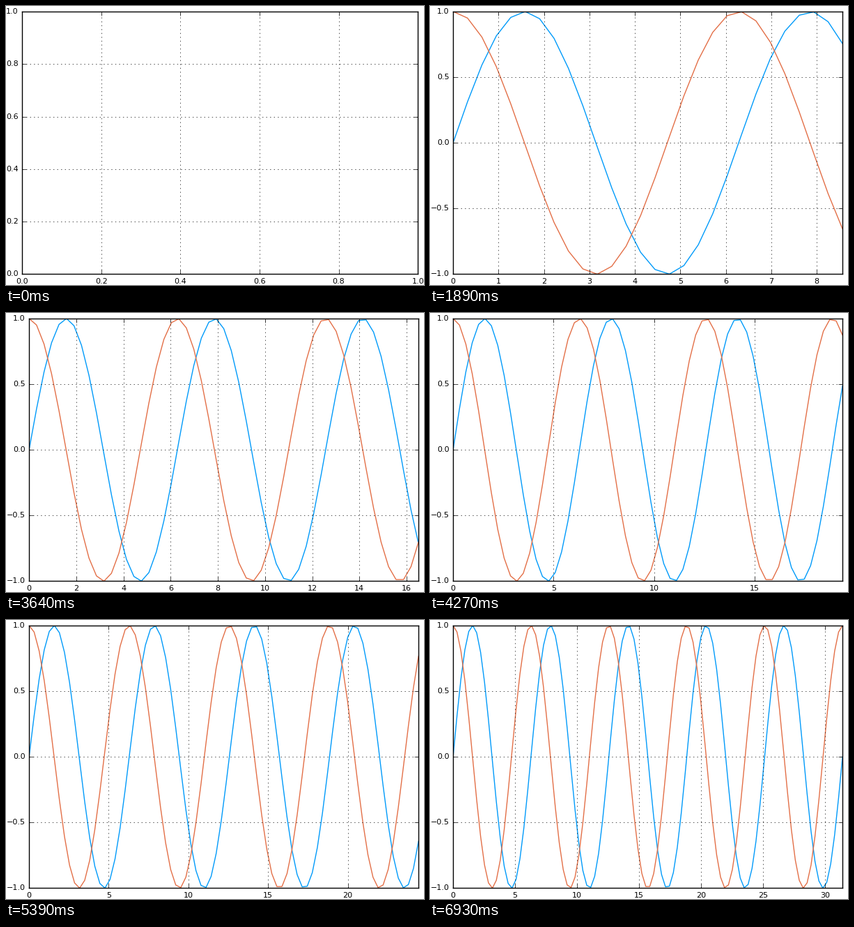
A matplotlib script for the animation above (7000 ms loop, 600x400 px).

```python
import math

import numpy as np
import matplotlib.pyplot as plt
from matplotlib.animation import FuncAnimation

WIDTH, HEIGHT, DPI = 600, 400, 100
COUNT, INTERVAL = 100, 70
MIN_PAD = 2 / 25.4 * DPI      # two millimetres
BOTTOM_PAD = 15.54
MAX_BINS = 9

plt.style.use("classic")
plt.rcParams.update({
    "font.family": "DejaVu Sans",
    "font.size": 8,
    "xtick.labelsize": 8,
    "ytick.labelsize": 8,
    "figure.facecolor": "white",
    "savefig.facecolor": "white",
    "axes.grid": True,
})

x = np.linspace(0, 10 * math.pi, COUNT)
waves = np.array([np.sin(x), np.cos(x)])

fig = plt.figure(figsize=(WIDTH / DPI, HEIGHT / DPI), dpi=DPI)
ax = fig.add_axes([0, 0, 1, 1])
lines = [ax.plot([], [], color=c, lw=1)[0] for c in ("#009AFA", "#E36F47")]


def tick_step(lo, hi):
    raw = (hi - lo) / MAX_BINS
    scale = 10.0 ** math.floor(math.log10(raw))
    return next(m * scale for m in (1, 2, 5, 10) if m * scale >= raw)


def ticks(lo, hi, pixels):
    """Tick places and labels; a tick within half a pixel of the edge counts."""
    step = tick_step(lo, hi)
    slack = 0.5 * (hi - lo) / pixels
    first = math.ceil((lo - slack) / step)
    last = math.floor((hi + slack) / step)
    values = [k * step for k in range(first, last + 1)]
    digits = max(0, -math.floor(math.log10(step)))
    labels = [f"{v:.{digits}f}".replace("-", "\u2212") for v in values]
    return np.clip(values, lo, hi), labels


def update(i):
    seen = waves[:, :i + 1]
    for line, y in zip(lines, seen):
        line.set_data(x[:i + 1], y)

    x_max = x[i] if i else 1.0
    y_min = seen.min()
    y_ticks, y_labels = ticks(y_min, 1.0, HEIGHT - MIN_PAD - BOTTOM_PAD)

    # The margins follow the labels that stick out of the plot area.
    left = 33.1 if y_labels[0].startswith("\u2212") else 23.2
    right = MIN_PAD if i else 8.85
    width = WIDTH - left - right
    height = HEIGHT - MIN_PAD - BOTTOM_PAD
    ax.set_position([left / WIDTH, BOTTOM_PAD / HEIGHT,
                     width / WIDTH, height / HEIGHT])

    x_ticks, x_labels = ticks(0.0, x_max, width)
    ax.set_xticks(x_ticks, x_labels)
    ax.set_yticks(y_ticks, y_labels)
    ax.set_xlim(0, x_max)
    ax.set_ylim(y_min, 1)
    return lines


anim = FuncAnimation(fig, update, frames=COUNT, interval=INTERVAL,
                     repeat=True, blit=False)
plt.show()
```
